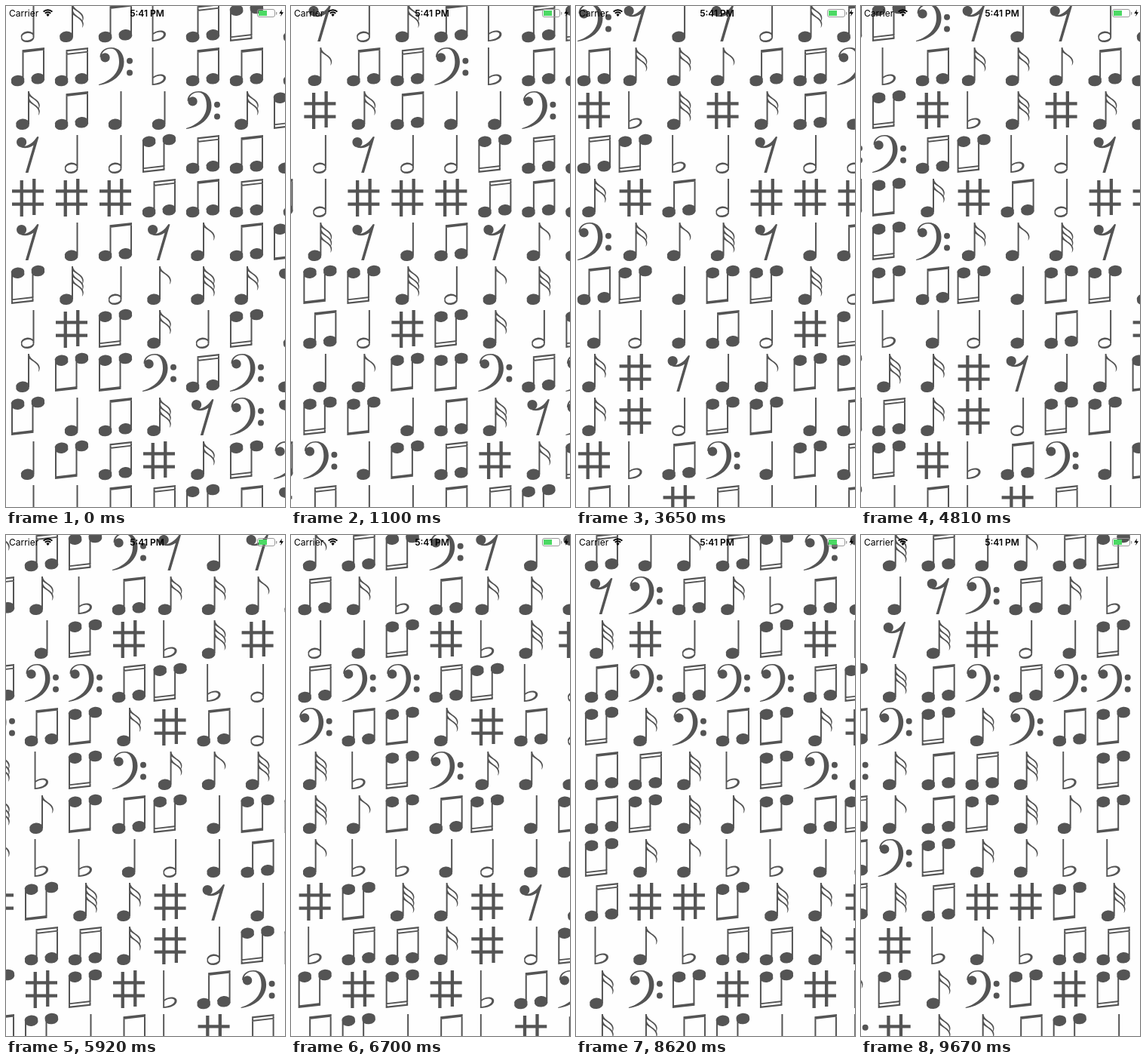
Recreate the animation shown at these times as an HTML page with a canvas. Size 370 px wide and 664 px high, loop 9.74 s.

```html
<!DOCTYPE html>
<html lang="en">
<head>
<meta charset="utf-8">
<style>
  html, body { margin: 0; width: 100%; height: 100%; overflow: hidden; background: #fefefe; }
  canvas { display: block; }
</style>
</head>
<body>
<canvas id="stage" width="370" height="664"></canvas>
<script>
const ctx = document.getElementById('stage').getContext('2d');
const LOOP = 9740, SPEED = 0.06125, PITCH = 58, NEWEST = 11;

// Outlines run clockwise so overlapping parts merge; holes run the other way.
const head = (x, y) => `M${x - 8.6} ${y + .8}a8.8 6.1 -6 1 1 17.2 -1.6a8.8 6.1 -6 1 1 -17.2 1.6z`;
const bar = (x, y, w, h) => `M${x} ${y}h${w}v${h}h${-w}z`;
const dot = (x, y, r) => `M${x - r} ${y}a${r} ${r} 0 1 1 ${2 * r} 0a${r} ${r} 0 1 1 ${-2 * r} 0z`;
const beam = (y, h) => `M14.5 ${y + 3.3}L44 ${y}v${h}L14.5 ${y + 3.3 + h}z`;
const flag = y => `M22.5 ${y}h1.3c.8 9 14 10 14 18.5c0 2.5-.8 4.5-2 5.5c.6-2 .8-3.5 .5-5c-1-5.5-6-8-13.8-13.5z`;

const quarter = head(21.6, 43.8) + bar(28.5, 0, 2, 44);
const eighth = head(15, 43.8) + bar(22, 0, 2, 44);
const pair = head(8.6, 44) + head(35.4, 41.3) + bar(14.5, 4, 2, 40) + bar(42, 1, 2, 40);
const single = pair + beam(0, 3.6);
const double = pair + beam(0, 2.2) + beam(4.8, 1.8);

const shapes = {
  q: quarter,
  h: quarter + 'M14.4 44.6a7.3 4.2 -8 1 0 14.4 -1.6a7.3 4.2 -8 1 0 -14.4 1.6z',
  e: eighth + flag(0),
  s: eighth + flag(0) + flag(8),
  t: eighth + flag(0) + flag(8) + flag(16),
  b: single,
  B: double,
  f: 'M1.5 13C1.5 4 9 0 16.5 0C27 0 33.5 8 33.5 19C33.5 36 18 48 0 50V49C16 44 27 34 27 19C27 9 23 1.6 16 1.6C9 1.6 4 6 3.5 12z'
    + dot(8.5, 13.4, 6.2) + dot(41, 17.7, 4) + dot(41, 33.5, 4),
  l: bar(12.6, 0, 1.9, 50) + 'M14 39C20 34 31 34 31 40.5C31 46 23 50 12.6 50V48.2C20 48 28 45 28 40.5C28 36.5 20 36.5 14 41z',
  r: dot(13.6, 9.5, 6.6) + 'M14 15.5C23 15 29 10 34.5 2L36.5 2.5L22.5 50H18.8L29.5 13.5C25 17 18 18.5 12 16z',
  x: bar(11.6, 2, 4.3, 48) + bar(28.1, 0, 4.3, 48) + bar(1, 14.2, 42, 4.3) + bar(1, 31.5, 42, 4.3)
};
const glyphs = {};
for (const name in shapes) glyphs[name] = new Path2D(shapes[name]);
for (const [name, base] of [['i', 'b'], ['I', 'B']]) {
  glyphs[name] = new Path2D();
  glyphs[name].addPath(glyphs[base], new DOMMatrix([-1, 0, 0, -1, 44, 50]));
}

// Each row lists its signs from the last column to enter to the first.
const rows = [
  'qtBqeBIfrqrhsblBIq',
  'qqrfBslbssebBflbbq',
  'qrtxhqIxltxsbqqfsI',
  'itbfBffBIlhrhhIBbs',
  'bfIsfbisxbhxxxBbBq',
  'fsbBtlIfsetrqbrebi',
  'BebIteibIqiIthetsr',
  'bfIsellqhqbhxIshIq',
  'BtBxxitsxrqeiifBfe',
  'lxlelBBsxhIiqbtrfr',
  'eIsfixIxlbfqiBxsIf',
  'fxssbiqblxBqqbBibr'
];

// Screen updates: start of a span in ms and how many steps it holds.
const spans = [[0, 1], [60, 12], [1100, 12], [2110, 1], [2170, 11], [3140, 6], [3650, 6], [4180, 7],
  [4810, 5], [5220, 8], [5920, 4], [6260, 11], [7240, 3], [7500, 9], [8290, 12], [9320, 4], [9670, 1]];

function stepTime(t) {
  const next = spans.findIndex(span => span[0] > t);
  const index = (next < 0 ? spans.length : next) - 1;
  const [start, steps] = spans[index];
  const step = ((next < 0 ? LOOP : spans[next][0]) - start) / steps;
  return start + Math.floor((t - start) / step) * step;
}

function drawNotes(shift) {
  ctx.fillStyle = '#545454';
  rows.forEach((row, r) => [...row].forEach((name, c) => {
    const column = NEWEST - c;
    const x = 7 - PITCH * column + (column > 3 ? 3.4 : 0) + shift;
    if (x < -50 || x > 370) return;
    ctx.save();
    ctx.translate(x, r * PITCH - 3);
    ctx.fill(glyphs[name]);
    ctx.restore();
  }));
}

function drawStatusBar() {
  ctx.fillStyle = '#000';
  ctx.font = '12px Inter, sans-serif';
  ctx.textAlign = 'left';
  ctx.fillText('Carrier', 4, 13.5);
  ctx.font = '600 12px Inter, sans-serif';
  ctx.textAlign = 'center';
  ctx.fillText('5:41 PM', 187, 13.5);

  ctx.strokeStyle = '#000';
  ctx.lineWidth = 2;
  for (const radius of [8.3, 5.2]) {
    ctx.beginPath();
    ctx.arc(55.5, 13.5, radius, -Math.PI * .75, -Math.PI * .25);
    ctx.stroke();
  }
  ctx.beginPath();
  ctx.moveTo(55.5, 14);
  ctx.arc(55.5, 13.5, 3, -Math.PI * .75, -Math.PI * .25);
  ctx.fill();

  ctx.strokeStyle = '#999';
  ctx.lineWidth = 1;
  ctx.beginPath();
  ctx.roundRect(333.5, 4.5, 23, 10, 2.5);
  ctx.stroke();
  ctx.fillStyle = '#999';
  ctx.fillRect(358, 8, 1.3, 3.5);
  ctx.fillStyle = '#4cd964';
  ctx.fillRect(335, 6, 11, 7);
  ctx.fillStyle = '#000';
  ctx.fill(new Path2D('M366 4.5L362.3 10H365L364 14L368 8.3H365.3z'));
}

function draw(now) {
  ctx.fillStyle = '#fefefe';
  ctx.fillRect(0, 0, 370, 664);
  drawNotes(stepTime(now % LOOP) * SPEED);
  drawStatusBar();
  requestAnimationFrame(draw);
}
draw(performance.now());
</script>
</body>
</html>
```
